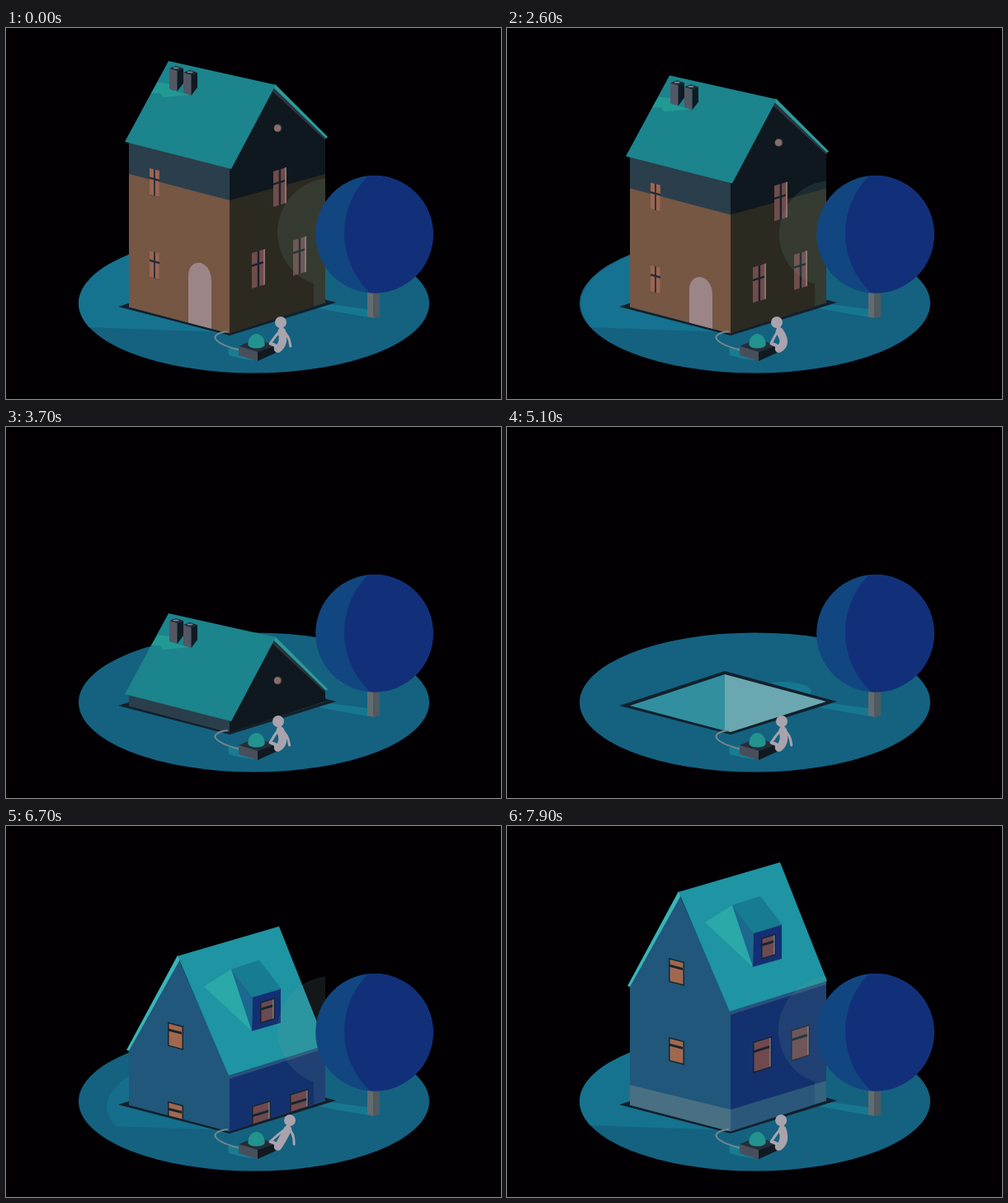
An HTML page with a canvas for the animation above (8000 ms loop, 600 by 450 pixels).

```html
<!DOCTYPE html>
<html lang="en">
<head>
<meta charset="utf-8">
<title>The sinking house</title>
<style>
html, body { margin: 0; width: 100%; height: 100%; overflow: hidden; background: #030004; }
canvas { display: block; width: 600px; height: 450px; }
</style>
</head>
<body>
<canvas id="stage" width="600" height="450"></canvas>
<script>
const ctx = document.getElementById('stage').getContext('2d');
const LOOP = 8000;
const SKIN = '#aaa3ad';
const LEFT = 0.262, RIGHT = -0.31;              // slopes of the two walls
const WEST = 149, CORNER = 271, EAST = 387;     // x of the wall edges

const clamp = v => Math.max(0, Math.min(1, v));
const ease = u => (1 - Math.cos(Math.PI * clamp(u))) / 2;
const span = (t, a, b) => ease((t - a) / (b - a));
const mix = (a, b, u) => a + (b - a) * u;

function trace(p) {
  ctx.beginPath();
  for (let i = 0; i < p.length; i += 2) ctx.lineTo(p[i], p[i + 1]);
  ctx.closePath();
}
function poly(color, ...p) {
  trace(p);
  ctx.fillStyle = color;
  ctx.fill();
}
function oval(color, x, y, rx, ry = rx) {
  ctx.beginPath();
  ctx.ellipse(x, y, rx, ry, 0, 0, Math.PI * 2);
  ctx.fillStyle = color;
  ctx.fill();
}
function limb(width, x0, y0, cx, cy, x1, y1) {
  ctx.beginPath();
  ctx.moveTo(x0, y0);
  ctx.quadraticCurveTo(cx, cy, x1, y1);
  ctx.strokeStyle = SKIN;
  ctx.lineWidth = width;
  ctx.lineCap = 'round';
  ctx.stroke();
}
// Upright parallelogram lying on a wall of slope k
function panel(color, x, y, w, h, k) {
  poly(color, x, y, x + w, y + w * k, x + w, y + h + w * k, x, y + h);
}
// Walls from a sloping top edge down to the ground
const leftWall = (color, a, b) => poly(color, WEST, a, CORNER, b, CORNER, 371, WEST, 339);
const rightWall = (color, a, b) => poly(color, CORNER, a, EAST, b, EAST, 334, CORNER, 371);

function within(path, draw) {
  ctx.save();
  path();
  ctx.clip();
  draw();
  ctx.restore();
}

function ground(size, glow) {
  oval('#146280', 300.5, 334, 212.5, 84.5);
  within(() => trace([0, 250, CORNER, 250, CORNER, 369, 100, 363, 0, 362]), () => {
    ctx.globalAlpha = glow;
    oval('#167390', CORNER + 29.5 * size, 366 - 32 * size, 212.5 * size, 84.5 * size);
  });
  oval('#187790', 335, 321, 34, 12);
  poly('#187790', 378, 340, 360, 326, 392, 335, 445, 342, 440, 351);
}

function pit() {
  poly('#12202c', 136, 338, 264, 296, 400, 333, CORNER, 373);
  poly('#318fa0', WEST, 338, 264, 300, 264, 368.5);
  poly('#6aa7b1', 264, 300, EAST, 333, CORNER, 370, 264, 368.5);
}

// Two panes divided by a cross
function crossWindow(x, y, w, h, k, frame, pane) {
  panel(frame, x, y, w, h, k);
  for (const s of [0, 0.57]) panel(pane, x + w * s, y + w * s * k, w * 0.42, h, k);
  panel(frame, x, y + h * 0.33, w, 2.5, k);
}
function tallWindow(x, y) {
  crossWindow(x, y, 16, 43, RIGHT, '#1a222d', '#704c4b');
  panel('#8d706d', x + 14, y + 14 * RIGHT, 2, 43, RIGHT);
}
function chimney(x, y) {
  panel('#535764', x, y, 9.5, 25, LEFT);
  poly('#101a22', x + 9.5, y + 3, x + 17, y, x + 17, y + 18, x + 9.5, y + 28);
  poly('#1c2732', x, y, x + 8, y - 3, x + 17, y, x + 9.5, y + 3);
  oval('#7b8490', x + 8, y - 0.4, 3.5, 1);
}
function door(x, y, w, h) {
  const drop = w * LEFT;
  ctx.beginPath();
  ctx.moveTo(x, y + h);
  ctx.lineTo(x, y);
  ctx.bezierCurveTo(x, y - 22, x + w, y - 21, x + w, y + drop);
  ctx.lineTo(x + w, y + h + drop);
  ctx.fillStyle = '#9b8587';
  ctx.fill();
}

function brownHouse() {
  leftWall('#2b3e4b', 137, 168);
  leftWall('#755744', 177, 209);
  rightWall('#0f181e', 170, 133);
  poly('#0f181e', CORNER, 171, 325, 72, EAST, 134);
  rightWall('#2c2a20', 209, 177);
  poly('#2b333f', 325, 72, 388, 133, EAST, 136, 323, 77);
  poly('#2a9c9b', 326, 68, 390, 132, 388, 134, 324, 72);
  poly('#1c848c', 197, 40, 327, 69, 273, 171, 144, 138);
  poly('#229a94', 184, 66, 199, 68, 199, 75, 222, 81, 190, 84, 187, 79, 176, 79);
  for (const i of [0, 1]) chimney(198 + 17 * i, 49 + 5 * i);
  oval('#39424a', 329.5, 121.5, 5);
  oval('#8c6c6a', 329, 121.5, 4);
  for (const y of [170, 270]) crossWindow(174, y, 12, 32, LEFT, '#222c39', '#9a6551');
  tallWindow(324, 174);
  for (const x of [298, 348]) tallWindow(x, 273 + (x - 298) * RIGHT);
  door(221, 300, 28, 58);
}

function sash(x, y, w, h, k, pane) {
  panel('#15242f', x, y, w, h, k);
  panel(pane, x + 1.5, y + 1.5 + 1.5 * k, w - 3, h - 3, k);
  panel('#15242f', x + 1, y + h * 0.27, w - 3, 3, k);
  if (k < 0) panel('#7d8088', x + w - 2.8, y + 1.5 + (w - 2.8) * k, 1.3, h - 3, k);
}

function blueHouse() {
  leftWall('#20577b', 192, 224);
  poly('#20577b', 208, 81, CORNER, 225, WEST, 193);
  rightWall('#14316f', 224, 188);
  leftWall('#496f82', 314, 344);
  rightWall('#2b587a', 344, 309);
  poly('#28527d', CORNER, 225, EAST, 188, EAST, 192, CORNER, 229);
  poly('#39b5b8', 208, 79, 211, 84, WEST, 195, 146, 194);
  poly('#1f94a2', 208, 80, 331, 44, 388, 188, 270, 225);
  poly('#2ba8a8', 240, 117, 273, 96, 298, 171);
  poly('#1c688e', 273, 96, 299, 130, 298, 171);
  poly('#177b92', 273, 96, 307, 85, 334, 120, 299, 130);
  poly('#142f74', 299, 130, 333, 120, 333, 161, 298, 171);
  sash(308, 136, 18, 26, RIGHT, '#6c4a52');
  for (const y of [160, 256]) sash(196, y, 19, 29, LEFT, '#a1684f');
  for (const x of [298, 344]) sash(x, 262 + (x - 298) * RIGHT, 23, 38, RIGHT, '#70494f');
}

// Tree shadow thrown on the wall, growing from the foot of the house
function wallShadow(size) {
  within(() => trace([CORNER, 0, EAST, 0, EAST, 333, CORNER, 370]), () => {
    ctx.translate(380, 338);
    ctx.scale(size, size);
    ctx.beginPath();
    ctx.arc(15, -90, 66, 0, Math.PI * 2);
    ctx.rect(-7, -30, 20, 34);
    ctx.fillStyle = 'rgba(115,165,150,0.14)';
    ctx.fill();
  });
}

function tree() {
  poly('#626c70', 438, 315, 446, 315, 446, 352, 438, 350);
  poly('#4e5a5f', 445, 315, 453, 315, 453, 350, 445, 352);
  oval('#124680', 446.5, 250.3, 71.3);
  within(() => {
    ctx.beginPath();
    ctx.arc(446.5, 250.3, 71.3, 0, Math.PI * 2);
  }, () => oval('#12307a', 509, 249, 99));
}

function device(push) {
  poly('#187c92', 269, 389, 284, 387, 300, 398, 300, 403, 286, 401, 270, 397);
  ctx.beginPath();
  ctx.moveTo(268, 368);
  ctx.bezierCurveTo(242, 372, 253, 383, 284, 391);
  ctx.strokeStyle = '#76888e';
  ctx.lineWidth = 2;
  ctx.stroke();
  poly('#252d38', 282, 386, 303, 377, 327, 385, 305, 393);
  poly('#484f5b', 282, 386, 305, 393, 305, 404, 282, 397);
  poly('#111a21', 305, 393, 327, 385, 327, 394, 305, 404);
  const top = 371 + 6 * push;
  ctx.beginPath();
  ctx.ellipse(303.5, 384, 10.2, 384 - top, 0, Math.PI, 0);
  ctx.ellipse(303.5, 384, 10.2, 4.5, 0, 0, Math.PI);
  ctx.fillStyle = '#22938f';
  ctx.fill();
}

// time, lean of the head, push on the button, swing of the far arm
const POSES = [
  [0, 2, 0, 1], [1150, 2, 0, 1], [1550, -11, 1, 0], [1850, -11, 1, 0],
  [2400, -4, 0, 0], [3000, -4, 0, 0], [3700, -1, 0, 1], [5100, 2, 0, 1],
  [6700, 13, 0, 1], [LOOP, 1, 0, 0]
];
function poseAt(t) {
  const i = POSES.findIndex(p => p[0] > t);
  const a = POSES[i - 1], b = POSES[i];
  const u = span(t, a[0], b[0]);
  return [1, 2, 3].map(n => mix(a[n], b[n], u));
}

function person(lean, push, swing) {
  const hx = 331 + lean, hy = 357 + 2.5 * push;
  const sx = 333 + 0.65 * lean, sy = 367;
  const farX = mix(mix(336, 344 + 0.4 * lean, swing), 311, push);
  const farY = mix(386, 381, push);
  const nearX = mix(320, 308, push), nearY = mix(383, 378, push);
  limb(3, sx + 1, sy, (sx + farX) / 2 + 4, (sy + farY) / 2 - 4, farX, farY);
  limb(9.5, sx, sy + 1, 339 - 0.4 * lean, 383, 329.5, 389);
  limb(4, 329, 391, 328, 384, 322, 383.5);
  limb(3, sx - 2, sy, (sx + nearX) / 2 - 1, (sy + nearY) / 2 - 1, nearX, nearY);
  limb(5, hx, hy, hx, hy, sx, sy);
  oval(SKIN, hx, hy, 7);
}

function draw(t) {
  const first = t < 5200;
  const sunk = first
    ? 230 * span(t, 2235, 4295) + 100 * span(t, 4450, 5050)
    : 330 * (1 - span(t, 5409, 7317));
  const size = clamp(1 - sunk * (first ? 0.0005 : 0.0024));
  const glow = clamp(1 - (sunk / 150) ** 2);
  const shade = first ? clamp(1 - (sunk / 128) ** 2) : clamp((232 - sunk) / 150);
  const [lean, push, swing] = poseAt(t);

  ctx.fillStyle = '#030004';
  ctx.fillRect(0, 0, 600, 450);
  ground(size, glow);
  pit();
  within(() => trace([0, 0, 600, 0, 600, 333, EAST, 333, CORNER, 370.5, WEST, 338.5, 0, 338.5]), () => {
    ctx.translate(0, sunk);
    if (first) brownHouse(); else blueHouse();
  });
  wallShadow(shade);
  tree();
  device(push);
  person(lean, push, swing);
}

function tick() {
  draw(performance.now() % LOOP);
  requestAnimationFrame(tick);
}
tick();
</script>
</body>
</html>
```
